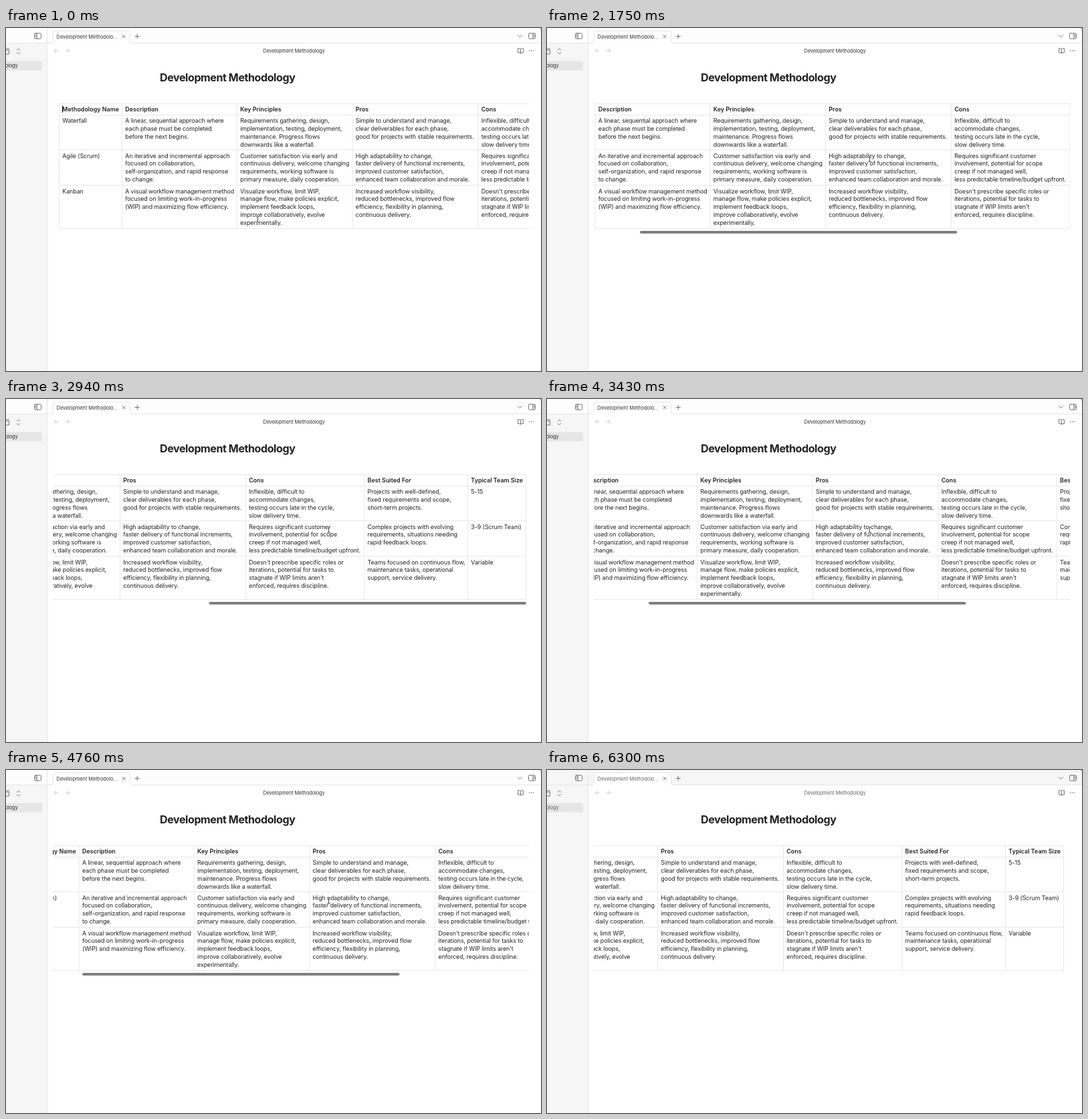
An HTML page for the animation above (6370 ms loop, 800 by 514 pixels).

```html
<!DOCTYPE html>
<html lang="en">
<head>
<meta charset="utf-8">
<title>Development Methodology</title>
<style>
  html, body { margin: 0; width: 100%; height: 100%; overflow: hidden; background: #fff; }
  svg { display: block; width: 100%; height: 100%; }
  text {
    font: 400 8.9px Inter, "Open Sans", sans-serif;
    font-optical-sizing: none;
    letter-spacing: -.08px;
    fill: #222;
    white-space: pre;
  }
  text.head { font-weight: 600; letter-spacing: .03px; }
  text.title { font-size: 16.1px; font-weight: 700; letter-spacing: -.45px; }
  text.ui { font-size: 7.4px; letter-spacing: -.1px; fill: #333; }
  text.tab { letter-spacing: -.04px; }
  .grid { fill: none; stroke: #e8e8e8; }
  .icon { fill: none; stroke: #666; stroke-width: .9; stroke-linecap: round; stroke-linejoin: round; }
  .dim { stroke: #c6c6c6; }
  .edge { fill: none; stroke: #e6e6e6; }
  .inactive #bar { fill: #f6f6f6; }
  .inactive text.ui { fill: #666; }
</style>
</head>
<body>
<svg id="stage" viewBox="0 0 800 514" preserveAspectRatio="none">
  <defs>
    <clipPath id="view"><rect x="70" y="100" width="712" height="214"/></clipPath>
  </defs>

  <rect id="bar" width="800" height="22.5" fill="#fdfdfd"/>
  <rect y="22.5" width="61.5" height="492" fill="#f6f6f6"/>
  <rect x="-4" y="49.5" width="58" height="14" rx="2" fill="#e6e6e6"/>
  <path class="edge" d="M61.5 0V514"/>
  <path d="M66 23Q70.5 23 70.5 18V8Q70.5 4.5 74 4.5H182Q185.5 4.5 185.5 8V18Q185.5 23 190 23Z" fill="#fff"/>
  <path class="edge" d="M0 22.5H66Q70.5 22.5 70.5 18V8Q70.5 4.5 74 4.5H182Q185.5 4.5 185.5 8V18Q185.5 22.5 190 22.5H800"/>
  <path d="M795 0H800V5Q800 0 795 0Z" fill="#ccc"/>

  <g class="icon">
    <rect x="42.5" y="8" width="10" height="8" rx="1.4"/>
    <path d="M46.2 8V16M44 10H44.8M44 11.6H44.8M44 13.2H44.8"/>
    <rect x="781.5" y="8" width="10" height="8" rx="1.4"/>
    <path d="M787.8 8V16M789.3 10H790.1M789.3 11.6H790.1M789.3 13.2H790.1"/>
    <path d="M-2 31H4.5M-2 33H4.5V39H-2"/>
    <path d="M16.2 33.3L18.5 31L20.8 33.3M16.2 36.7L18.5 39L20.8 36.7"/>
    <path d="M173.8 10.6L178.2 15M178.2 10.6L173.8 15"/>
    <path d="M193 12.5H199.4M196.2 9.3V15.7"/>
    <path d="M765.5 10.8L768.4 13.6L771.3 10.8"/>
    <path d="M769.5 31.6Q769 30.6 767.5 30.6H765.6V37H768Q769.3 37 769.5 38Q769.7 37 771 37H773.4V30.6H771.5Q770 30.6 769.5 31.6V38"/>
    <path d="M782.6 34H782.7M785.5 34H785.6M788.4 34H788.5" stroke-width="1.5"/>
    <path class="dim" d="M78.2 34H72.4M75 31.2L72.2 34L75 36.8M88.8 34H94.6M92 31.2L94.8 34L92 36.8"/>
  </g>

  <text class="ui" x="17.5" y="59.2" text-anchor="end">Development Methodology</text>
  <text class="ui tab" x="75.6" y="15.6">Development Methodolo...</text>
  <text class="ui" x="430.5" y="36.6" text-anchor="middle">Development Methodology</text>
  <text class="title" x="230" y="79.7">Development Methodology</text>

  <g clip-path="url(#view)">
    <g id="table"></g>
    <rect id="thumb" y="304" width="474.5" height="4" rx="2" fill="#7f7f7f"/>
  </g>

  <g id="pointer" fill="none" stroke-linecap="round">
    <path d="M-2-4.6Q0-4.6 0-3V3Q0 4.6-2 4.6M2-4.6Q0-4.6 0-3M0 3Q0 4.6 2 4.6" stroke="#fff" stroke-width="2"/>
    <path d="M-2-4.6Q0-4.6 0-3V3Q0 4.6-2 4.6M2-4.6Q0-4.6 0-3M0 3Q0 4.6 2 4.6" stroke="#333" stroke-width=".9"/>
  </g>
</svg>
<script>
const LOOP = 6370, STEP = 70;
const colX = [79.5, 173.5, 345.5, 518, 706, 883.3, 1038, 1125];
const rowY = [113, 130, 182.5, 235.5, 300];
const lineHeight = 11.85;

// One entry per column; "|" marks a line break inside a cell.
const columns = [
  ["Methodology Name", "Waterfall", "Agile (Scrum)", "Kanban"],
  ["Description",
    "A linear, sequential approach where|each phase must be completed|before the next begins.",
    "An iterative and incremental approach|focused on collaboration,|self-organization, and rapid response|to change.",
    "A visual workflow management method|focused on limiting work-in-progress|(WIP) and maximizing flow efficiency."],
  ["Key Principles",
    "Requirements gathering, design,|implementation, testing, deployment,|maintenance. Progress flows|downwards like a waterfall.",
    "Customer satisfaction via early and|continuous delivery, welcome changing|requirements, working software is|primary measure, daily cooperation.",
    "Visualize workflow, limit WIP,|manage flow, make policies explicit,|implement feedback loops,|improve collaboratively, evolve|experimentally."],
  ["Pros",
    "Simple to understand and manage,|clear deliverables for each phase,|good for projects with stable requirements.",
    "High adaptability to change,|faster delivery of functional increments,|improved customer satisfaction,|enhanced team collaboration and morale.",
    "Increased workflow visibility,|reduced bottlenecks, improved flow|efficiency, flexibility in planning,|continuous delivery."],
  ["Cons",
    "Inflexible, difficult to|accommodate changes,|testing occurs late in the cycle,|slow delivery time.",
    "Requires significant customer|involvement, potential for scope|creep if not managed well,|less predictable timeline/budget upfront.",
    "Doesn't prescribe specific roles or|iterations, potential for tasks to|stagnate if WIP limits aren't|enforced, requires discipline."],
  ["Best Suited For",
    "Projects with well-defined,|fixed requirements and scope,|short-term projects.",
    "Complex projects with evolving|requirements, situations needing|rapid feedback loops.",
    "Teams focused on continuous flow,|maintenance tasks, operational|support, service delivery."],
  ["Typical Team Size", "5-15", "3-9 (Scrum Team)", "Variable"]
];

const scrollKeys = [
  [0, 0], [840, 0], [1050, 12], [1750, 101.5], [2200, 335], [2380, 352.5],
  [2870, 352.5], [2940, 347.5], [3430, 121], [3780, 8], [3990, 0],
  [4550, 0], [4620, 8], [5110, 291.5], [5250, 348], [5320, 352.5], [LOOP, 352.5]
];
const pointerX = [[0, 376.5], [280, 482.5], [6020, 482.5], [6300, 700], [LOOP, 700]];
const pointerY = [[0, 287], [280, 196], [6020, 196], [6300, -12], [LOOP, -12]];
const fadeKeys = [[0, 1], [5390, 1], [5810, 0], [LOOP, 0]];

const $ = id => document.getElementById(id);
const stage = $("stage"), table = $("table"), thumb = $("thumb"), pointer = $("pointer");

function add(tag, attrs, content = "") {
  const el = document.createElementNS("http://www.w3.org/2000/svg", tag);
  for (const key in attrs) el.setAttribute(key, attrs[key]);
  el.textContent = content;
  return table.appendChild(el);
}

// Smooth interpolation that never overshoots its keys.
function curve(keys, t) {
  let i = 0;
  while (i < keys.length - 2 && t >= keys[i + 1][0]) i++;
  const rate = n => n < 0 || n > keys.length - 2 ? 0
    : (keys[n + 1][1] - keys[n][1]) / (keys[n + 1][0] - keys[n][0]);
  const slope = n => {
    const a = rate(n - 1), b = rate(n);
    return a * b > 0 ? 2 * a * b / (a + b) : 0;
  };
  const [t0, v0] = keys[i], [t1, v1] = keys[i + 1];
  const span = t1 - t0, u = (t - t0) / span, w = 1 - u;
  return v0 * w * w * (1 + 2 * u) + v1 * u * u * (3 - 2 * u)
    + span * u * w * (slope(i) * w - slope(i + 1) * u);
}

const left = colX[0], right = colX[colX.length - 1];
add("path", {
  class: "grid",
  d: rowY.map(y => `M${left} ${Math.floor(y) + .5}H${right}`).join("")
    + colX.map(x => `M${x} 113V300.5`).join("")
});
columns.forEach((cells, c) => cells.forEach((cell, r) =>
  cell.split("|").forEach((line, n) => add("text", {
    class: r ? "body" : "head",
    x: colX[c] + 4.8,
    y: (r ? rowY[r] + 12.1 : 124.7) + n * lineHeight
  }, line))));
const caret = add("rect", { x: 84, y: 116, width: 1, height: 11, fill: "#222" });

function draw(now) {
  const t = Math.floor(now % LOOP / STEP) * STEP;
  const scroll = curve(scrollKeys, t);
  table.setAttribute("transform", `translate(${-scroll} 0)`);
  thumb.setAttribute("x", 71 + scroll * .669);
  thumb.setAttribute("opacity", t < 910 ? 0 : curve(fadeKeys, t));
  pointer.setAttribute("transform", `translate(${curve(pointerX, t)} ${curve(pointerY, t)})`);
  caret.setAttribute("opacity", t < 420 ? 1 : 0);
  stage.classList.toggle("inactive", t >= 6090);
}

const start = performance.now();
function tick() {
  draw(performance.now() - start);
  requestAnimationFrame(tick);
}
tick();
</script>
</body>
</html>
```
